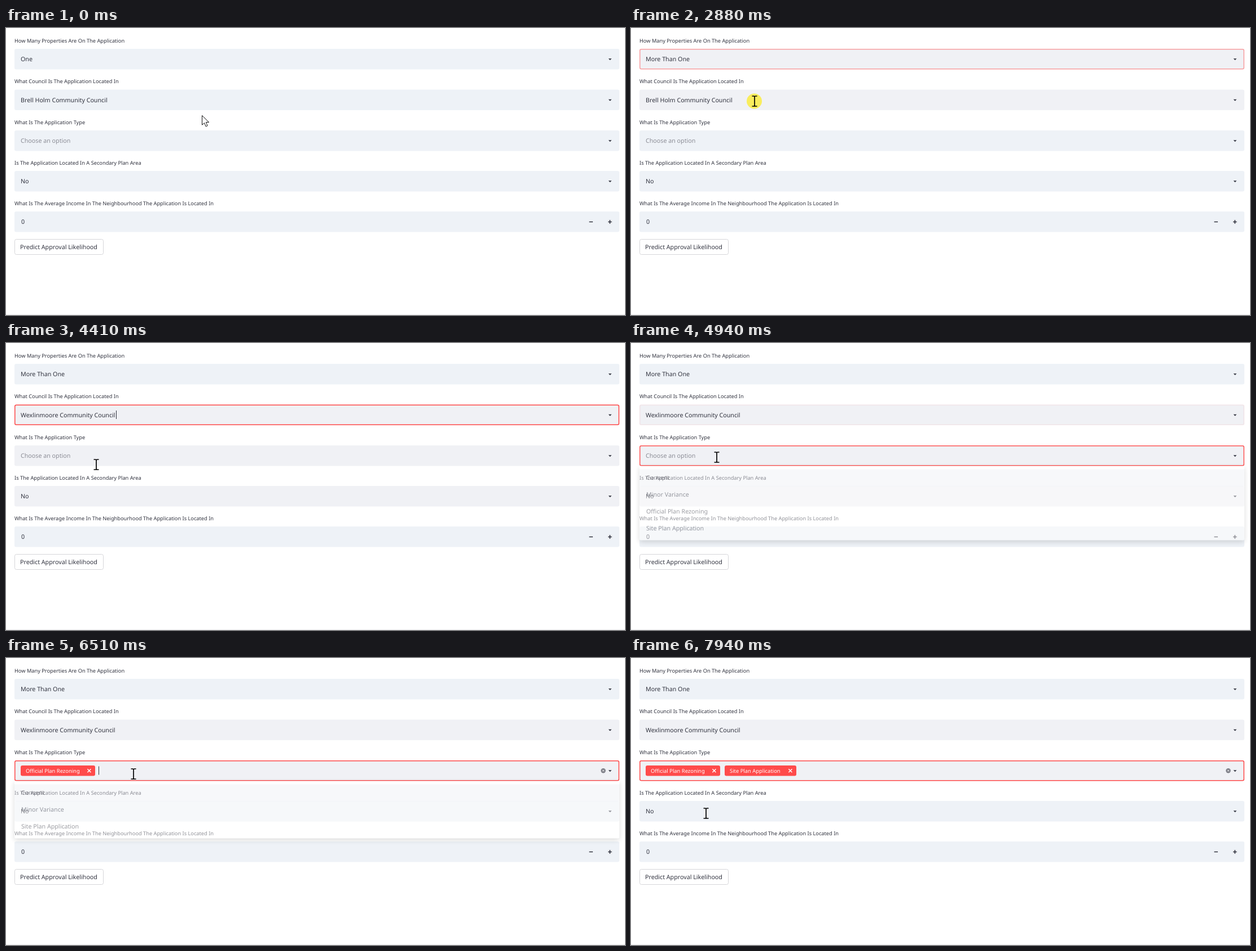
An HTML page for the animation above (8 s loop, 1097 px wide and 510 px high).

```html
<!DOCTYPE html>
<html lang="en">
<head>
<meta charset="utf-8">
<title>Approval form</title>
<style>
  html, body { margin: 0; width: 100%; height: 100%; overflow: hidden; background: #fff; }
  svg { display: block; width: 1097px; height: 510px; }
  text {
    font: 10.7px "Noto Sans", "Open Sans", sans-serif;
    fill: #31333f;
    text-rendering: geometricPrecision;
    white-space: pre;
  }
  .label { font-size: 9.24px; }
  .hint { fill: #8b8c95; }
  .tag text { font-size: 9.4px; font-weight: 500; fill: #fff; }
  .menu > rect:first-child { filter: drop-shadow(0 3px 5px rgba(0, 0, 0, .3)); }
  .ink { fill: none; stroke: #31333f; }
</style>
</head>
<body>
<svg id="stage" viewBox="0 0 1097 510"></svg>
<script>
const LOOP = 8000, LEFT = 15, WIDTH = 1072, HEIGHT = 36.5;
const RED = '#ff4b4b', COOL = '#eef2f7', WARM = '#f0f1f5';
const TOPS = [37, 109.5, 182, 254, 326];
const LABELS = [
  'How Many Properties Are On The Application',
  'What Council Is The Application Located In',
  'What Is The Application Type',
  'Is The Application Located In A Secondary Plan Area',
  'What Is The Average Income In The Neighbourhood The Application Is Located In'
];
const COUNCILS = ['Adlorn Pell', 'Brell Holm', 'Wexlinmoore', 'Yarrin and East Holm']
  .map(name => name + ' Community Council');
const TYPES = ['Consent', 'Minor Variance', 'Official Plan Rezoning', 'Site Plan Application'];

// open and close times are [start, end] of each fade
const MENUS = [
  { field: 0, first: 0, open: [1050, 1180], close: [2130, 2240], items: ['One', 'More Than One'] },
  { field: 1, first: 1, open: [2950, 3080], close: [4040, 4150], items: COUNCILS },
  { field: 2, first: 0, open: [4880, 5010], close: [5730, 5900], items: TYPES },
  { field: 2, first: 0, open: [6450, 6580], close: [7250, 7390], items: TYPES.filter((_, i) => i !== 2) }
];
const FOCUS = [
  { open: [970, 1110], close: [2810, 2950] },
  { open: [2890, 3020], close: [4830, 4950] },
  { open: [4830, 4950], close: [9000, 9100] }
];
const CLICKS = [970, 2100, 2820, 4010, 4790, 5640, 6385, 7190];
const CLICK_TIME = 120;

// pointer path: time, x, y
const PATH = [
  [0, 347, 155], [830, 272, 57], [1350, 272, 57], [1570, 214, 74], [1640, 164, 91],
  [1840, 120, 117], [2500, 120, 117], [2880, 219, 130], [3300, 219, 130], [3820, 160, 216],
  [4410, 160, 216], [4760, 152, 203], [5170, 152, 203], [5640, 126, 290], [5970, 126, 290],
  [6310, 226, 206], [6800, 226, 206], [7050, 151, 290], [7480, 151, 290], [7940, 133, 276]
];

const stage = document.getElementById('stage');

function add(tag, attrs, parent = stage, content = '') {
  const node = document.createElementNS('http://www.w3.org/2000/svg', tag);
  for (const key in attrs) node.setAttribute(key, attrs[key]);
  node.textContent = content;
  parent.appendChild(node);
  return node;
}
const write = (x, y, content, parent, cls = '') => add('text', { x, y, class: cls }, parent, content);
const set = (node, key, value) => node.setAttribute(key, value);
const show = (node, alpha) => set(node, 'opacity', Number(alpha));
const ramp = (t, [a, b]) => Math.min(1, Math.max(0, (t - a) / (b - a)));
const fade = (t, span) => ramp(t, span.open) - ramp(t, span.close);
const within = (t, a, b) => t >= a && t < b;

const fields = TOPS.map((top, i) => {
  write(LEFT, top - 11.3, LABELS[i], stage, 'label');
  const box = add('rect', { x: LEFT, y: top, width: WIDTH, height: HEIGHT, rx: 3, fill: COOL });
  const ring = add('rect', {
    x: LEFT + .75, y: top + .75, width: WIDTH - 1.5, height: HEIGHT - 1.5, rx: 2.5,
    fill: 'none', stroke: RED, 'stroke-width': 1.5, opacity: 0
  });
  const value = write(i === 4 ? 27 : 26, top + 22.3, ['', '', 'Choose an option', 'No', '0'][i], stage, i === 2 ? 'hint' : '');
  if (i < 4) add('path', { d: `M1067.6 ${top + 17.3}h5.8l-2.9 3z`, fill: '#31333f' });
  return { box, ring, value };
});
add('path', { d: 'M1033.5 344.5h6.5M1067 344.5h6.6M1070.3 341.2v6.6', class: 'ink', 'stroke-width': 1.7 });

function makeTag(x, width, name) {
  const group = add('g', { class: 'tag' });
  add('rect', { x, y: 191, width, height: 18.5, rx: 3, fill: RED }, group);
  write(x + 9, 203.7, name, group);
  add('path', {
    d: `M${x + width - 13.6} 197.2l6 6m0 -6l-6 6`, stroke: '#fff', 'stroke-width': 1.5
  }, group);
  return group;
}
const tags = [makeTag(26, 132, TYPES[2]), makeTag(166, 127, TYPES[3])];
const clear = add('g', {});
add('circle', { cx: 1058.5, cy: 200.2, r: 4.2, fill: '#7d7e87' }, clear);
add('path', { d: 'M1057 198.7l3 3m0 -3l-3 3', stroke: '#fff' }, clear);

const caret = add('rect', { width: 1, height: 15, fill: '#31333f' });

add('rect', { x: 15.5, y: 375.5, width: 157, height: 27, rx: 3, fill: '#fff', stroke: '#d6d6d9' });
write(25, 393, 'Predict Approval Likelihood');
add('rect', { x: 0, y: 509, width: 1097, height: 1, fill: '#ececee' });

const menus = MENUS.map(menu => {
  const top = TOPS[menu.field] + HEIGHT;
  const group = add('g', { class: 'menu' });
  add('rect', { x: LEFT, y: top, width: WIDTH, height: 12 + 30 * menu.items.length, rx: 2, fill: '#fff' }, group);
  const hover = add('rect', { x: LEFT, width: WIDTH, height: 30, fill: '#f0f1f5' }, group);
  menu.items.forEach((item, i) => write(27, top + 24.8 + 30 * i, item, group));
  return { ...menu, top, group, hover };
});

const glow = add('circle', { r: 13.5, fill: '#ffea00', 'fill-opacity': .62 });
const pointer = add('g', {});
const shapes = {
  arrow: add('path', {
    d: 'M.5 .5V17.2L4.5 13.6L7.2 20L10.1 18.7L7.4 12.5H12.6Z',
    fill: '#fff', stroke: '#111', 'stroke-linejoin': 'round'
  }, pointer),
  beam: add('path', {
    d: 'M-4.5 -9H-1.6Q0 -9 0 -7.6Q0 -9 1.6 -9H4.5M-4.5 9H-1.6Q0 9 0 7.6Q0 9 1.6 9H4.5M0 -8V8',
    fill: 'none', stroke: '#000', 'stroke-width': 1.7
  }, pointer),
  hand: add('path', {
    d: 'M-1.8 14V1.8a1.8 1.8 0 0 1 3.6 0V8a1.7 1.7 0 0 1 3.2 .6a1.7 1.7 0 0 1 3.2 .7' +
       'a1.5 1.5 0 0 1 2.5 1V16c0 3 -2 4 -2 7H-1.2c0 -2 -2 -3 -3.2 -5.2L-6.8 13.8c-1 -2 1 -3.4 2.6 -2Z' +
       'M1.8 8v4M5 8.8v3.4M8.2 9.6v3',
    fill: '#fff', stroke: '#222', 'stroke-linejoin': 'round'
  }, pointer)
};

function pointerAt(t) {
  const i = PATH.findIndex(point => point[0] > t);
  if (i < 0) return PATH[PATH.length - 1].slice(1);
  const [t0, x0, y0] = PATH[i - 1], [t1, x1, y1] = PATH[i];
  let k = (t - t0) / (t1 - t0);
  if (t1 - t0 > 230) k = k * k * (3 - 2 * k);
  return [x0 + (x1 - x0) * k, y0 + (y1 - y0) * k];
}

function setValue(node, content) {
  if (node.textContent !== content) node.textContent = content;
}

function placeCaret(t) {
  const end = i => 26 + fields[i].value.getComputedTextLength() + 1;
  let spot = null;
  if (within(t, 1180, 1700)) spot = [end(0), 0];
  else if (within(t, 3080, 3600) || within(t, 4410, 4830)) spot = [end(1), 1];
  else if (within(t, 6310, 6840)) spot = [163.5, 2];
  show(caret, spot !== null);
  if (spot) {
    set(caret, 'x', Math.round(spot[0]));
    set(caret, 'y', TOPS[spot[1]] + 10.5);
  }
}

function render(t) {
  const [x, y] = pointerAt(t);

  setValue(fields[0].value, t < 2170 ? 'One' : 'More Than One');
  setValue(fields[1].value, COUNCILS[t < 4090 ? 1 : 2]);
  show(fields[2].value, t < 5830);
  show(tags[0], t >= 5830);
  show(tags[1], t >= 7300);
  show(clear, t >= 5830);

  const warm = [within(t, 970, 3100), t > 1200, t > 2950, within(t, 2950, 5800)];
  warm.forEach((on, i) => set(fields[i].box, 'fill', on ? WARM : COOL));
  FOCUS.forEach((span, i) => show(fields[i].ring, fade(t, span)));
  placeCaret(t);

  let shape = TOPS.some(top => y >= top && y <= top + HEIGHT + 1) ? 'beam' : 'arrow';
  for (const menu of menus) {
    const alpha = fade(t, menu);
    const inside = y > menu.top + 2;
    let row = menu.first;
    if (inside) row = Math.min(menu.items.length - 1, Math.max(0, Math.floor((y - menu.top - 6) / 30)));
    show(menu.group, alpha);
    set(menu.hover, 'y', menu.top + 6 + 30 * row);
    if (alpha > .5 && inside) shape = 'hand';
  }

  set(pointer, 'transform', `translate(${x.toFixed(1)} ${y.toFixed(1)})`);
  for (const name in shapes) show(shapes[name], name === shape);
  show(glow, CLICKS.some(click => within(t, click, click + CLICK_TIME)));
  set(glow, 'cx', x - .5);
  set(glow, 'cy', y);
}

const start = performance.now();
function tick() {
  render((performance.now() - start) % LOOP);
  requestAnimationFrame(tick);
}
tick();
</script>
</body>
</html>
```
